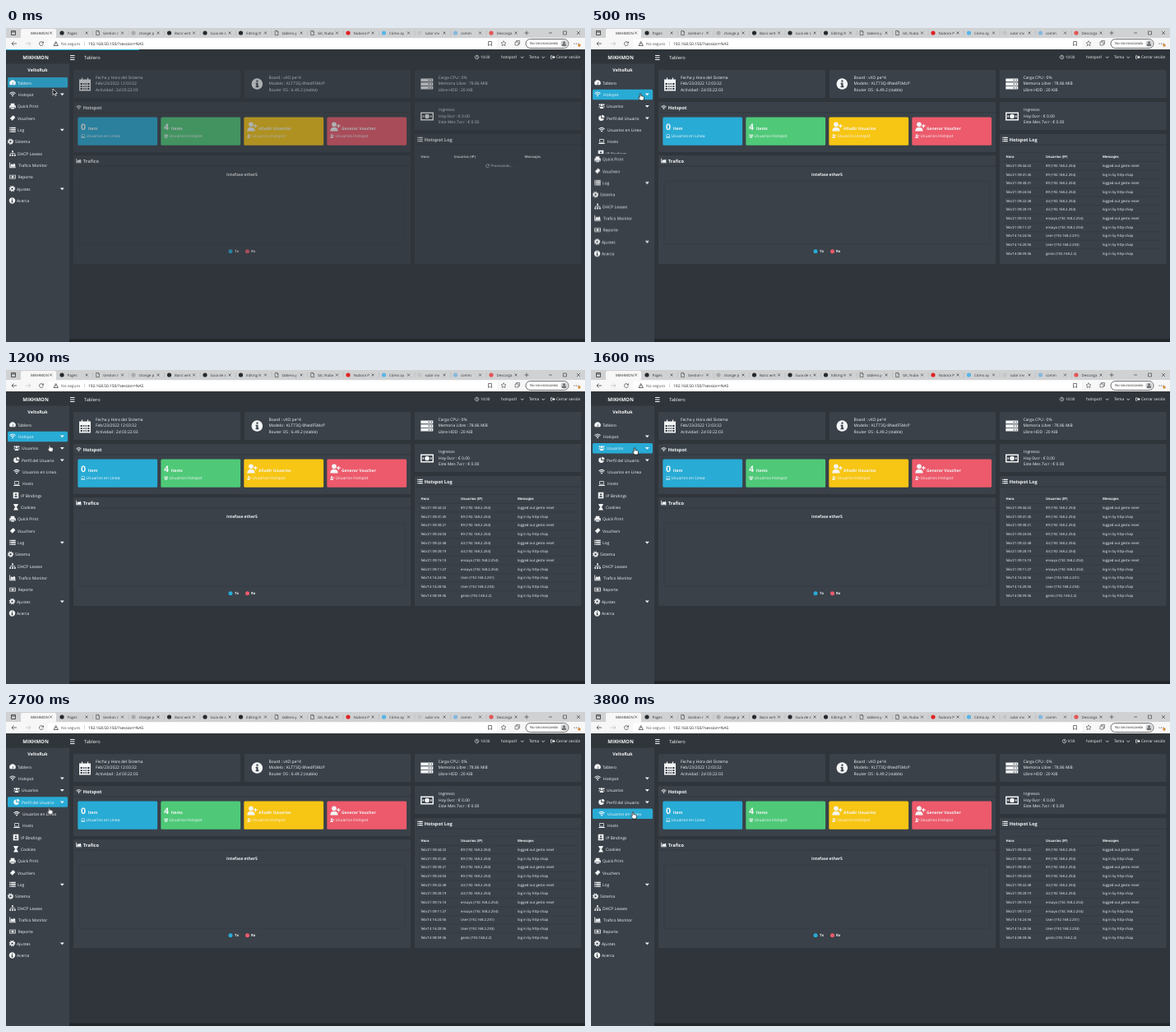
Recreate the animation shown at these times as an HTML page. Size 704x382 px, loop 4300 ms.

```html
<!DOCTYPE html>
<html lang="es">
<head>
<meta charset="utf-8">
<title>Tablero</title>
<style>
html, body { margin: 0; width: 100%; height: 100%; overflow: hidden; background: #2f353a; }
svg { display: block; width: 100vw; height: 100vh; font-family: "Open Sans", "Noto Sans", sans-serif; }
text { white-space: pre; text-rendering: geometricPrecision; }
.a { animation: 4300ms step-end infinite; }
.page { animation-name: page; }
.wait { animation-name: wait; }
.rows { animation-name: rows; }
.bar { animation-name: bar; }
.home { animation-name: home; }
.hot { animation-name: hot; }
.users { animation-name: users; }
.profile { animation-name: profile; }
.online { animation-name: online; }
.lower { animation-name: lower; }
.move { animation-name: move; }
.early { animation-name: early; }
.late { animation-name: late; }
@keyframes page { 0% { opacity: .64 } 2.32% { opacity: .82 } 4.65%, 100% { opacity: 1 } }
@keyframes wait { 0% { opacity: 1 } 2.32%, 100% { opacity: 0 } }
@keyframes rows { 0% { opacity: 0 } 2.32%, 100% { opacity: 1 } }
@keyframes bar {
  0% { transform: scaleX(.23) } 2.32% { transform: scaleX(.41) } 4.65% { transform: scaleX(.58) }
  6.97% { transform: scaleX(1); opacity: 1 } 9.3%, 100% { transform: scaleX(1); opacity: 0 }
}
@keyframes home { 0% { opacity: .8 } 2.32% { opacity: .5 } 4.65% { opacity: .15 } 6.97%, 100% { opacity: 0 } }
@keyframes hot {
  0% { opacity: 0 } 2.32% { opacity: .4 } 4.65% { opacity: .8 } 6.97% { opacity: 1 }
  30.23% { opacity: .6 } 32.55% { opacity: .15 } 34.88%, 100% { opacity: 0 }
}
@keyframes users {
  0% { opacity: 0 } 30.23% { opacity: .4 } 32.55% { opacity: .85 } 34.88% { opacity: 1 }
  46.51% { opacity: .6 } 48.83% { opacity: .15 } 51.16%, 100% { opacity: 0 }
}
@keyframes profile {
  0% { opacity: 0 } 46.51% { opacity: .4 } 48.83% { opacity: .88 } 51.16% { opacity: 1 }
  69.76% { opacity: .6 } 72.09% { opacity: .15 } 74.41%, 100% { opacity: 0 }
}
@keyframes online { 0% { opacity: 0 } 69.76% { opacity: .4 } 72.09% { opacity: .78 } 74.41%, 100% { opacity: 1 } }
@keyframes lower {
  0% { transform: none } 4.65% { transform: translateY(0); animation-timing-function: steps(4) }
  13.95%, 100% { transform: translateY(86px) }
}
@keyframes move {
  0% { transform: translate(57px, 74px); animation-timing-function: steps(2) }
  4.65% { transform: translate(60px, 79px) }
  16.27% { transform: translate(60px, 79px); animation-timing-function: steps(3) }
  23.25% { transform: translate(52.5px, 87px); animation-timing-function: steps(3) }
  30.23% { transform: translate(53px, 92px); animation-timing-function: steps(3) }
  37.2% { transform: translate(53px, 94px); animation-timing-function: steps(3) }
  44.18% { transform: translate(54px, 104px); animation-timing-function: steps(2) }
  48.83% { transform: translate(54px, 109px); animation-timing-function: steps(2) }
  53.48% { transform: translate(54px, 110px) }
  55.81% { transform: translate(54px, 110px); animation-timing-function: steps(6) }
  69.76%, 100% { transform: translate(51px, 121px) }
}
@keyframes early { 0% { opacity: 1 } 88.37%, 100% { opacity: 0 } }
@keyframes late { 0% { opacity: 0 } 88.37%, 100% { opacity: 1 } }
</style>
</head>
<body>
<svg id="stage" viewBox="0 0 704 382" preserveAspectRatio="none"></svg>
<script>
const SIDE = '#3a4149', BACK = '#2f353a', INK = '#f4f6f7';
const BLUE = '#28abd5', GREEN = '#4fc978', YELLOW = '#f7c514', RED = '#ec5a6b';

const rect = (x, y, w, h, fill, r = 0, more = '') =>
  `<rect x="${x}" y="${y}" width="${w}" height="${h}" rx="${r}" fill="${fill}" ${more}/>`;
const dot = (x, y, r, fill) => `<circle cx="${x}" cy="${y}" r="${r}" fill="${fill}"/>`;
const line = (d, color, w = .7) => `<path d="${d}" fill="none" stroke="${color}" stroke-width="${w}"/>`;
const shape = d => `<path fill-rule="evenodd" d="${d}"/>`;
const stroke = (d, w = 2) => `<path d="${d}" fill="none" stroke="currentColor" stroke-width="${w}"/>`;
const group = (cls, body) => `<g class="a ${cls}">${body}</g>`;

// y is the middle of the lowercase letters
const text = (x, y, s, size = 4.95, fill = INK, weight = 500, anchor = 'start') =>
  `<text x="${x}" y="${(y + size * .34).toFixed(2)}" font-size="${size}" fill="${fill}"` +
  ` font-weight="${weight}" text-anchor="${anchor}">${s}</text>`;
const bold = (x, y, s, size = 4.95, anchor) => text(x, y, s, size, INK, 700, anchor);

// icons live in a 16 by 16 box
const icons = {
  gauge: shape('M1.5 14A8 8 0 1 1 14.5 14ZM7 12L10.5 5 9.3 12.5Z'),
  wifi: stroke('M.5 6Q8-.5 15.5 6M3.2 9Q8 4.8 12.8 9', 2.2) + shape('M5.4 11Q8 9 10.6 11L8 14.5Z'),
  print: shape('M3 1h10v5H3zM0 6h16v7h-3v-3H3v3H0zM4 11h8v4H4z'),
  ticket: shape('M1 9L9 1l2 2h2v2l2 2-8 8-2-2v-2H3z'),
  list: shape([1.5, 6.5, 11.5].map(y => `M0 ${y}h3v3H0zM4 ${y}h12v3H4z`).join('')),
  gear: '<circle cx="8" cy="8" r="4.2" fill="none" stroke="currentColor" stroke-width="3.4"/>' +
    '<circle cx="8" cy="8" r="6.8" fill="none" stroke="currentColor" stroke-width="2.4" stroke-dasharray="2.67"/>',
  tree: shape('M6 1h4v4H6zM0 11h4v4H0zM6 11h4v4H6zM12 11h4v4h-4z') + stroke('M8 5v6M2 11V8h12v3', 1.3),
  chart: shape('M0 1h2v12h14v2H0zM3 12V8l3-4 3 3 3-4 3 4v5z'),
  money: shape('M0 3h16v10H0zM1.5 4.5v7h13v-7z') + '<circle cx="8" cy="8" r="2.8"/>' + shape('M2.5 7H4v2H2.5zM12 7h1.5v2H12z'),
  info: shape('M8 0a8 8 0 1 0 .01 0zM7 2.8h2.4v2.4H7zM6 6.5h3.4V11h1v2H6v-2h1V8.5H6z'),
  users: '<circle cx="8" cy="5" r="3"/><circle cx="2.8" cy="4" r="2.2"/><circle cx="13.2" cy="4" r="2.2"/>' +
    shape('M3 14q0-5 5-5t5 5zM0 11q0-4 4-4l1 1q-3 1-3 3zM16 11q0-4-4-4l-1 1q3 1 3 3z'),
  pie: shape('M7 1.5a7 7 0 1 0 7.5 7.5H7zM9 0a7 7 0 0 1 7 7H9z'),
  laptop: shape('M2 2h12v9H2zM3.5 3.5v6h9v-6zM0 12h16v2H0z'),
  card: shape('M1 0h14v16H1zM8 3a2.4 2.4 0 1 0 .01 0zM4 13h8q0-4-4-4t-4 4z'),
  glass: shape('M2 0h12v2H2zM2 14h12v2H2zM3 2h10q0 4-4 6 4 2 4 6H3q0-4 4-6-4-2-4-6z'),
  add: '<circle cx="6" cy="4.5" r="3.6"/>' + shape('M0 15q0-6 6-6t6 6zM12 4h1.6v2H16v1.6h-2.4V10H12V7.6H10V6h2z'),
  calendar: shape('M1 2h14v14H1zM2.5 6.5v8h11v-8z') + stroke('M4.5 0v4M11.5 0v4M2 9.2h12M2 12h12M5.5 6v9M8 6v9M10.5 6v9', 1.2),
  server: [1, 6, 11].map(y => shape(`M0 ${y}h16v4H0zM10 ${y + 1.4}h1.4v1.4H10zM13 ${y + 1.4}h1.4v1.4H13z`)).join(''),
  clock: stroke('M8 1.5a6.5 6.5 0 1 0 .01 0zM8 4v4.5l3 1.5'),
  exit: shape('M0 2h6v2H2v8h4v2H0zM5 6h5V2l6 6-6 6v-4H5z'),
  spin: stroke('M13.5 5A6.5 6.5 0 1 0 14 10M14.5 1v5h-5', 1.8),
  page: stroke('M3 1h7l3 3v11H3zM10 1v4h3', 1.5)
};
const icon = (name, x, y, s, color = INK) =>
  `<g transform="translate(${x - s / 2} ${y - s / 2}) scale(${s / 16})" fill="${color}" color="${color}">${icons[name]}</g>`;

function browser() {
  let s = rect(0, 0, 704, 13, '#cfd1d3') + rect(0, 12, 704, 14, '#f7f7f7') + rect(18, 1, 43, 12, '#f7f7f7', 2);
  s += line('M6.5 3.5h5v5h-5zM6.5 5h5', '#333', .8) + text(30, 6, 'MIKHMON', 4.4, '#222');
  const tabs = ['Pages', 'Gestion r', 'change p', 'Basic writ', 'Guia de s', 'Editing R', 'tablero.y',
    'Git, Nubo', 'Nubora P', 'Cómo ay', 'subir inv', 'comm', 'Descarga'];
  const marks = '#24292e,page,#aaa,#24292e,#24292e,#24292e,page,page,#e02424,#58b5e8,#c4c4c4,#85b7dc,#e25555'.split(',');
  tabs.forEach((name, i) => {
    const x = 68 + i * 43.5;
    s += marks[i] === 'page' ? icon('page', x, 6, 6, '#333') : dot(x, 6, 2.6, marks[i]);
    s += text(x + 6.5, 6, name, 4.4, '#333');
    if (i) s += line(`M${x - 6} 3v6`, '#aaa', .4);
  });
  for (let i = 0; i < 14; i++) s += line(`M${53 + i * 43.5} 4.5l3 3m0-3l-3 3`, '#333', .6);
  s += line('M630.5 6h5m-2.5-2.5v5M660 6h4M677.5 4h4v4h-4zM694 4l4 4m0-4l-4 4', '#333', .6);
  s += rect(51, 13.5, 546, 11, '#fff', 2);
  s += line('M13 19H7m2.5-2.5L7 19l2.5 2.5', '#333') + line('M24 19h6m-2.5-2.5L30 19l-2.5 2.5', '#bbb');
  s += icon('spin', 43, 19, 6, '#333') + line('M58 21.5l2.7-5 2.7 5z', '#444', .8) + line('M60.7 18.3v1.5', '#444');
  s += text(67, 19, 'No seguro', 4.85, '#555') + line('M95.5 16.5v5', '#aaa', .5);
  s += text(100, 19, '192.168.50.150/?session=NAS', 4.85, '#222');
  s += line('M586.5 16.5h4v5l-2-1.5-2 1.5z', '#444');
  s += line('M603 21.5l.5-2-1.5-1.5 2-.3 1-2 1 2 2 .3-1.5 1.5.5 2-2-1zM619 17h4v4h-4zM620.5 17v-1.5h4v4H623', '#444', .6);
  s += rect(632, 13.5, 52, 11, '#fff', 5.5, 'stroke="#333" stroke-width=".7"') + text(637, 19, 'No sincronizando', 4.2, '#222');
  s += dot(678.5, 19, 4, '#c9cdd1') + dot(678.5, 17.8, 1.4, '#666') + '<path d="M675.8 21.7q0-2.4 2.7-2.4t2.7 2.4z" fill="#666"/>';
  s += [691, 693.5, 696].map(x => dot(x, 19, .6, '#333')).join('') + dot(697, 21, 1.7, '#d58b35');
  return s;
}

const item = (y, name, label, x = 14, more = false, ix = 8) =>
  icon(name, ix, y - .5, 7.5) + text(x, y, label) +
  (more ? `<path d="M65.8 ${y - 1.5}h5l-2.5 2.7z" fill="${INK}"/>` : '');
const hover = (y, cls) => rect(2, y, 73, 12.5, BLUE, 1.5, `class="a ${cls}"`);
const menu = list => list.map((r, i) => item(95.6 + i * 14.35, ...r)).join('');

function sidebar() {
  const sub = [['users', 'Usuarios', 19, true, 13], ['pie', 'Perfil del Usuario', 19, true, 12.7],
    ['wifi', 'Usuarios en Linea', 20, false, 13], ['laptop', 'Hosts', 20, false, 13],
    ['card', 'IP Bindings', 18, false, 12], ['glass', 'Cookies', 18, false, 12]];
  const low = [['print', 'Quick Print'], ['ticket', 'Vouchers'], ['list', 'Log', 14, true], ['gear', 'Sistema', 11, false, 5.5],
    ['tree', 'DHCP Leases'], ['chart', 'Trafico Monitor', 15], ['money', 'Reporte', 14.5], ['gear', 'Ajustes', 13, true, 7.5],
    ['info', 'Acerca', 13, false, 7.5]];
  return rect(0, 43, 77, 339, SIDE) + bold(38.5, 51.5, 'VeltoRuk', 5.4, 'middle') +
    hover(60, 'home') + hover(74.7, 'hot') + hover(89, 'users') + hover(103.2, 'profile') + hover(117.5, 'online') +
    item(67, 'gauge', 'Tablero') + item(81, 'wifi', 'Hotspot', 15, true) + menu(sub) +
    group('lower', rect(0, 88.2, 77, 300, SIDE) + menu(low));
}

function header() {
  const clock = (x, label) => icon('clock', x, 35.5, 5.5) + text(588.5, 35.7, label, 4.6, INK, 500, 'end');
  return rect(0, 26, 704, 17.5, BACK) + bold(36, 36, 'MIKHMON', 6, 'middle') +
    line('M78 33.5h5.5M78 36h5.5M78 38.5h5.5', INK, 1.2) + text(95, 36, 'Tablero', 5.7) +
    group('early', clock(572.5, '10:00')) + group('late', clock(575.5, '9:59')) +
    text(602, 35.7, 'hotspot1', 4.8) + line('M626 34.8l1.7 1.7 1.7-1.7M651.5 34.8l1.7 1.7 1.7-1.7', INK, .8) +
    text(636, 35.7, 'Tema', 4.8) + icon('exit', 665, 35.5, 5.5) + text(669, 35.7, 'Cerrar sesión', 4.75);
}

const card = (x, y, w, h) => rect(x, y, w, h, SIDE, 1);
const title = (x, y, w, name, label) =>
  icon(name, x + 6.5, y + 6.5, 6.5) + bold(x + 11.8, y + 6.8, label, 5.65) + line(`M${x} ${y + 13}h${w}`, '#30363c', .8);
const lines = (x, y, list) => list.map((t, i) => text(x, y + i * 7.7, t)).join('');

function tile(i, color, big, label, name, sub) {
  const x = 87 + i * 101;
  const head = big === 'add'
    ? icon('add', x + 10.5, 120, 12.5) + bold(x + 18, 122, label)
    : bold(x + 4, 120.3, big, 10.5) + bold(x + 12.8, 122, label);
  return rect(x + .3, 108.4, 96.8, 34.4, color, 1.5) + head + icon(name, x + 6.7, 131.5, 5.2) + text(x + 10.5, 131.8, sub);
}

function log() {
  const stamps = ['21 09:44:22', '21 09:41:45', '21 09:30:21', '21 09:24:04', '21 09:22:48', '21 09:20:19',
    '21 09:15:10', '21 09:11:27', '14 16:24:56', '14 16:20:56', '14 08:59:36'];
  const who = i => i < 4 ? '89 (192.168.2.254)' : i < 6 ? '44 (192.168.2.254)' : i < 8 ? 'ensayo (192.168.2.254)'
    : ['User (192.168.2.251)', 'User (192.168.2.253)', 'gesto (192.168.2.2)'][i - 8];
  const head = (a, b) => bold(504.5, 157, 'Hora', 4.2) + bold(a, 157, 'Usuarios (IP)', 4.2) + bold(b, 157, 'Mensajes', 4.2);
  const rows = stamps.map((t, i) => {
    const y = 167.7 + i * 10.64;
    const msg = i < 8 && i % 2 === 0 ? 'logged out gesto reset' : 'log in by http-chap';
    return line(`M502 ${y - 5.3}h192`, '#333a41', .6) +
      text(504.5, y, 'feb/' + t, 4.25) + text(553, y, who(i), 4.25) + text(622, y, msg, 4.3);
  }).join('');
  return line('M502 151.5h192M502 162.4h192', '#333a41', .6) +
    group('wait', head(544.5, 630.5) + icon('spin', 585.5, 167.7, 4.8) + text(589.5, 168, 'Procesando...', 4.2)) +
    group('rows', head(553, 622) + rows);
}

function content() {
  return group('page',
    card(82, 51, 203, 34) + icon('calendar', 96, 68.5, 16) +
    lines(109, 60, ['Fecha y Hora del Sistema', 'Feb/23/2022 12:03:32', 'Actividad : 2d 03:22:03']) +
    card(290, 51, 202, 34) + icon('info', 305.3, 68, 13.5) +
    lines(319.5, 60, ['Board : vXO pe^4', 'Modelo : KLT73Q-8NedF5MzP', 'Router OS : 6.49.2 (stable)']) +
    card(497, 51, 202.5, 34) + icon('server', 511.8, 68, 15) +
    lines(525.5, 60, ['Carga CPU : 0%', 'Memoria Libre : 78.86 MiB', 'Libre HDD : 20 KiB']) +
    card(497, 90, 202.5, 34) + icon('money', 512, 107.5, 16) +
    lines(526, 99.3, ['Ingresos', 'Hoy 0vcr : € 0.00', 'Este Mes 7vcr : € 0.00']) +
    card(82, 90, 410, 61) + title(82, 90, 410, 'wifi', 'Hotspot') +
    tile(0, BLUE, '0', 'Item', 'laptop', 'Usuarios en Linea') +
    tile(1, GREEN, '4', 'Items', 'users', 'Usuarios Hotspot') +
    tile(2, YELLOW, 'add', 'Añadir Usuarios', 'add', 'Usuarios Hotspot') +
    tile(3, RED, 'add', 'Generar Voucher', 'add', 'Usuarios Hotspot') +
    card(82, 155, 410, 132) + title(82, 155, 410, 'chart', 'Trafico') +
    bold(287, 178.5, 'Intefase ether5', 4.95, 'middle') + line('M89 186.5h396V263H89z', '#343b42') +
    dot(273, 271.8, 2.5, BLUE) + bold(278, 272, 'Tx', 4.3) + dot(293.5, 271.8, 2.5, RED) + bold(298, 272, 'Rx', 4.3) +
    card(497, 129, 202.5, 158) + title(497, 129, 202.5, 'list', 'Hotspot Log') + log());
}

const arrow = '<path d="M0 0v7.5l1.8-1.6 1.3 2.7 1.2-.6L3 5.4h2.4z" fill="#111" stroke="#fff" stroke-width=".7"/>';
const hand = '<path d="M-.8 5.5V1q.8-1 1.6 0v2.5l3 .8q.9.3.8 1.5L3.9 9H0l-2.5-3.2q.3-1.3 1.7-.3z" fill="#fff" stroke="#111" stroke-width=".7"/>';

document.getElementById('stage').innerHTML =
  rect(0, 0, 704, 382, BACK) + content() + sidebar() + header() + browser() +
  rect(0, 26, 704, 1, BLUE, 0, 'class="a bar"') + rect(77, 378.5, 627, 3.5, '#212529') +
  group('move', group('wait', arrow) + group('rows', hand));
</script>
</body>
</html>
```
